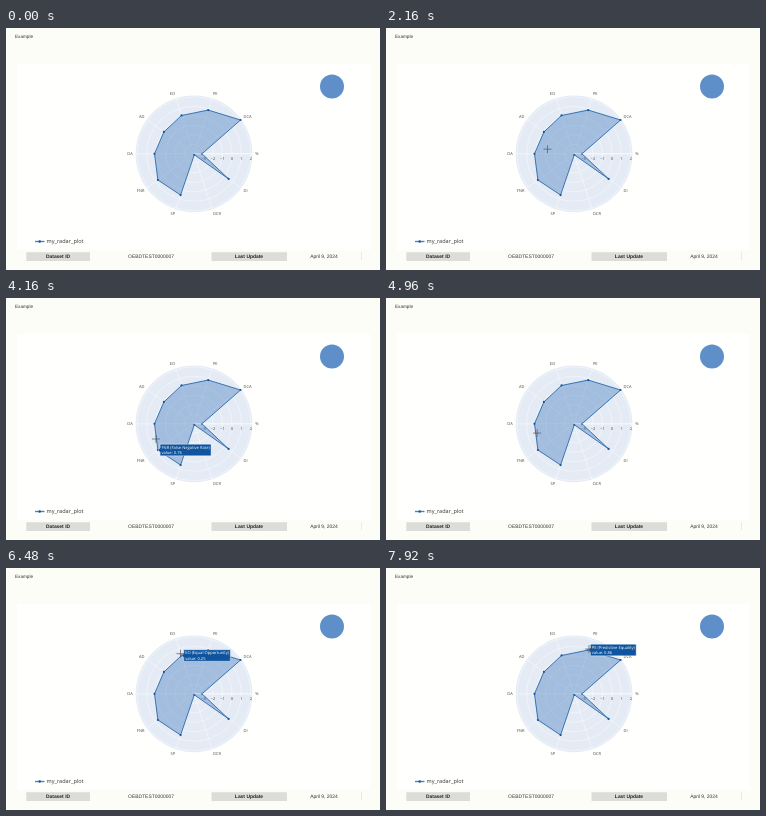
An HTML page that plays this animation: 374x242 px, repeating every 8000 ms.

```html
<!DOCTYPE html>
<html lang="en">
<head>
<meta charset="utf-8">
<style>
  html, body { margin: 0; width: 100%; height: 100%; overflow: hidden; background: #fdfdf8; }
  svg { display: block; width: 374px; height: 242px; text-rendering: geometricPrecision; }
  text { font-family: "Liberation Sans", sans-serif; font-size: 4.95px; fill: #333; }
  .mid { text-anchor: middle; }
  .start { text-anchor: start; }
  .end { text-anchor: end; }
  .bold { font-weight: 700; fill: #222; }
  .plot text { font-family: "Open Sans", sans-serif; font-size: 4px; fill: #444; }
  .plot .legend { font-size: 5.55px; fill: #333; }
  .plot .tip text { font-size: 4.08px; fill: #fff; }
  .grid { fill: none; stroke: #fff; stroke-width: .4; }
  .series { fill: #1d60ad; fill-opacity: .33; stroke: #1f62a8; stroke-width: .85; stroke-linejoin: round; }
  .dot { fill: #14559c; }
</style>
</head>
<body>
<svg viewBox="0 0 374 242">
  <rect x="11" y="36" width="353" height="186" fill="#fffffd"/>
  <text x="9" y="10.3" style="font-size:4.65px">Example</text>
  <circle cx="326" cy="58.5" r="12" fill="#5e8fc9"/>

  <g class="plot">
    <g id="radar"></g>
    <path d="M29 213.500H38.500" stroke="#4a84c0" stroke-width="1.4"/>
    <circle class="dot" cx="33.7" cy="213.5" r="1.2"/>
    <text class="legend" x="40.5" y="215.2">my_radar_plot</text>
    <g id="tip" class="tip">
      <path fill="#0f549e" stroke="#fff" stroke-width=".4"/>
      <text></text><text></text>
    </g>
  </g>

  <path d="M20.300 224.200h63.700v8.800h-63.700zM205.500 224.200h75.500v8.800h-75.500z" fill="#dcdcd9"/>
  <path d="M355.500 224v8" stroke="#dcdcd9" stroke-width=".6"/>
  <g class="mid">
    <text class="bold" x="52" y="230.2">Dataset ID</text>
    <text x="145" y="230.2">OEBDTEST0000007</text>
    <text class="bold" x="243" y="230.2">Last Update</text>
    <text x="318" y="230.2">April 9, 2024</text>
  </g>

  <path id="arrow" d="M-1.500 -3V2.500L0 1.200L1 3.300L2 2.800L1 .8H2.700Z" fill="#fff" stroke="#666" stroke-width=".5"/>
  <path id="cross" d="M-4 0H4M0 -4V4" stroke="#555" stroke-width=".7"/>
</svg>
<script>
const LOOP = 8000, STEP = 80;
const CX = 188, CY = 125.8, R = 58.4, UNIT = 9.5, REACH = 11.5;
const $ = id => document.getElementById(id);

// label, radius, tooltip lines
const metrics = [
  ['%', 8],
  ['DCA', 57.5],
  ['PE', 46, 'PE (Predictive Equality)', 'value: 0.86'],
  ['EO', 40.3, 'EO (Equal Opportunity)', 'value: 0.25'],
  ['AD', 37.2, 'AD (Accuracy Difference)', 'value: -0.05'],
  ['OA', 39.5],
  ['FNR', 44.6, 'FNR (False Negative Rate)', 'value: 0.76'],
  ['SP', 43.4, 'SP (Statistical Parity)', 'value: 0.56'],
  ['DCR', 1],
  ['DI', 42.8]
];

// cursor stops: time, x, y
const stops = [
  [1120, 0, 64], [1280, 105, 88], [1520, 105, 88],
  [2320, 168, 125], [2400, 168, 125],
  [2960, 171, 164], [3920, 171, 164],
  [4160, 150, 141], [4800, 150, 141],
  [5440, 157, 103], [5680, 157, 103],
  [6320, 174.5, 85.7], [7120, 174.5, 85.7],
  [7760, 203, 81], [LOOP, 203, 81]
];

const polar = (i, rx, ry = rx) => {
  const a = i * Math.PI / 5;
  return [CX + rx * Math.cos(a), CY - ry * Math.sin(a)];
};
const points = metrics.map(([, r], i) => polar(i, r));

function drawRadar() {
  let s = `<circle cx="${CX}" cy="${CY}" r="${R}" fill="#e5ebf5"/>`;
  for (let k = 1; k <= 6; k++) s += `<circle class="grid" cx="${CX}" cy="${CY}" r="${k * UNIT}"/>`;
  metrics.forEach((m, i) => { s += `<path class="grid" d="M${CX} ${CY}L${polar(i, R)}"/>`; });
  s += `<polygon class="series" points="${points.join(' ')}"/>`;
  points.forEach(([x, y]) => { s += `<circle class="dot" cx="${x}" cy="${y}" r="1.1"/>`; });
  s += `<path d="M${CX} ${CY}h${R}" stroke="#fff" stroke-width=".5"/>`;
  for (let k = 1; k <= 6; k++) {
    s += `<text class="mid" x="${CX + k * UNIT}" y="132">${String(k - 4).replace('-', '−')}</text>`;
  }
  metrics.forEach(([label], i) => {
    const [x, y] = polar(i, 61.3, 63);
    s += `<text class="${x > CX ? 'start' : 'end'}" x="${x}" y="${y + 1.5}">${label}</text>`;
  });
  $('radar').innerHTML = s;
}

function cursorAt(t) {
  const n = stops.findIndex(s => s[0] > t);
  if (n < 1) return null;
  const [t0, x0, y0] = stops[n - 1], [t1, x1, y1] = stops[n];
  const u = (t - t0) / (t1 - t0), e = u * u * (3 - 2 * u);
  return [x0 + (x1 - x0) * e, y0 + (y1 - y0) * e];
}

function place(el, visible, pos) {
  el.style.display = visible ? '' : 'none';
  if (visible) el.setAttribute('transform', `translate(${pos})`);
}

function showTip(index) {
  const lines = index < 0 ? [] : metrics[index].slice(2);
  const tip = $('tip');
  place(tip, lines.length > 0, points[index]);
  if (!lines.length) return;
  const [box, ...rows] = tip.children;
  rows.forEach((row, i) => {
    row.textContent = lines[i];
    row.setAttribute('x', 3.6);
    row.setAttribute('y', i ? 4.1 : -1.1);
  });
  const width = rows[0].getComputedTextLength() + 2.8;
  box.setAttribute('d', `M0 0L2.2 -2V-5.8h${width}V5.8h${-width}V2Z`);
}

function render(time) {
  const pos = cursorAt(Math.floor(time % LOOP / STEP) * STEP);
  const dist = ([x, y]) => Math.hypot(x - pos[0], y - pos[1]);
  const inside = pos && dist([CX, CY]) < R;
  let near = -1;
  if (inside) {
    const gaps = points.map(dist), least = Math.min(...gaps);
    if (least < REACH) near = gaps.indexOf(least);
  }
  showTip(near);
  place($('cross'), inside, pos);
  place($('arrow'), pos && !inside, pos);
}

drawRadar();
const start = performance.now();
(function tick() {
  render(performance.now() - start);
  requestAnimationFrame(tick);
})();
</script>
</body>
</html>
```
